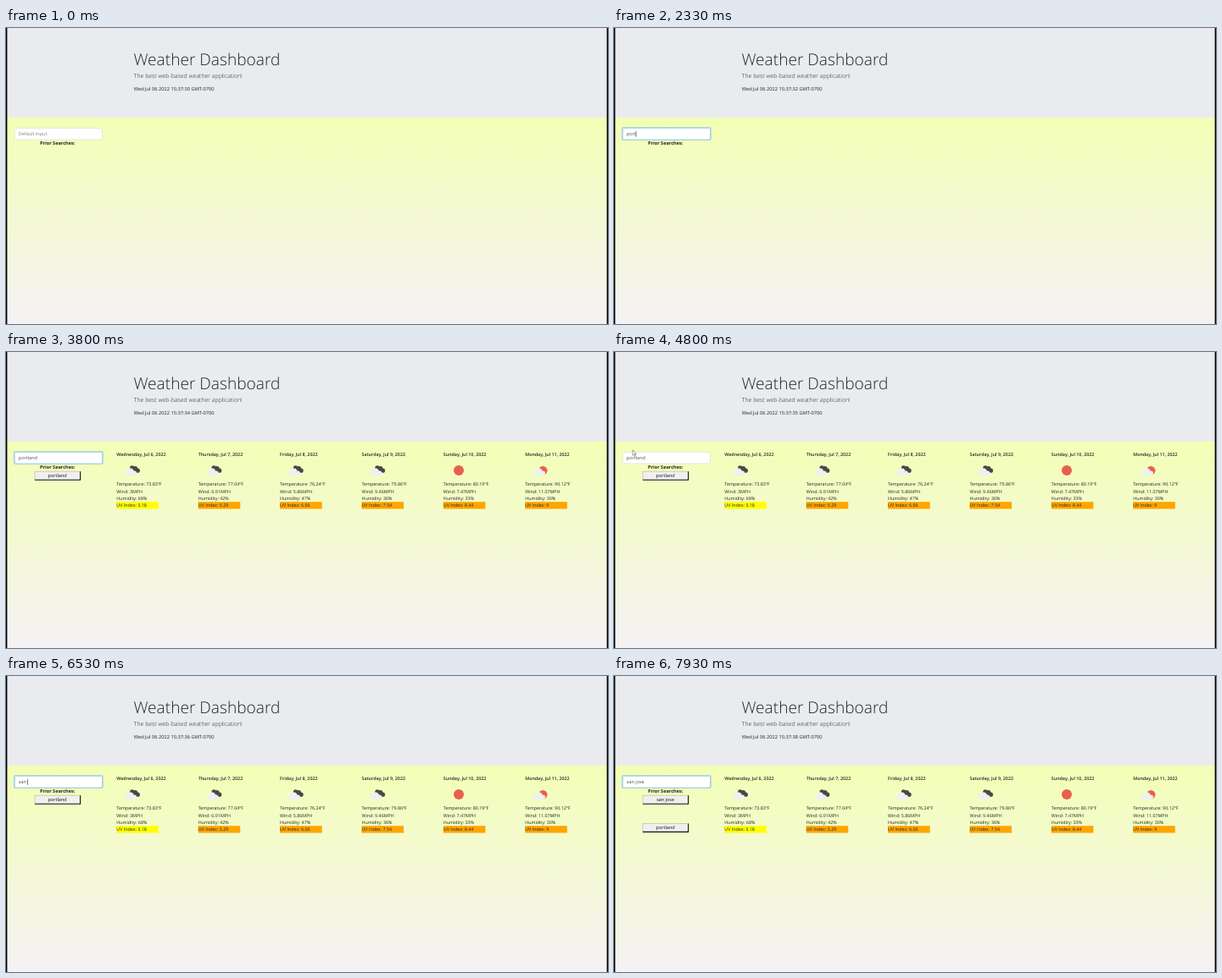
Animation of 710x350 px, one loop 8 s. Source, as an HTML page:

```html
<!DOCTYPE html>
<html lang="en">
<head>
<meta charset="utf-8">
<title>Weather Dashboard</title>
<style>
  html, body { margin: 0; width: 100%; height: 100%; overflow: hidden; background: #000; }
  svg { display: block; width: 100%; height: 100%; }
  text {
    font: 5.35px "Open Sans", "Noto Sans", sans-serif;
    fill: #212529;
    text-rendering: geometricPrecision;
    white-space: pre;
  }
  .title { font-size: 19.15px; font-weight: 300; }
  .lead { font-size: 6.96px; font-weight: 300; }
  .clock { font-size: 5.7px; }
  .date { font-weight: 600; }
  .prior { font-size: 5.56px; font-weight: 700; }
  .field { font-size: 5.5px; fill: #495057; }
  .field.empty { fill: #7b838a; }
  .label { font-size: 5.5px; text-anchor: middle; fill: #111; }
</style>
</head>
<body>
<svg viewBox="0 0 710 350">
  <defs>
    <linearGradient id="sky" x2="0" y2="1">
      <stop stop-color="#f3ffb5"/>
      <stop offset="1" stop-color="#f5f2f5"/>
    </linearGradient>
    <g id="cloud">
      <circle cx="3" cy="6" r="2.7"/><circle cx="7.2" cy="4" r="3.7"/><circle cx="11.8" cy="6" r="2.7"/>
      <rect x="3" y="4.5" width="9" height="4.2"/>
    </g>
    <g id="clouds">
      <g fill="#484848">
        <circle cx="18.5" cy="137" r="2.7"/><circle cx="22" cy="138" r="3"/><circle cx="25" cy="140.2" r="2.6"/>
      </g>
      <use href="#cloud" x="9.3" y="137.3" fill="#f0f0f0"/>
    </g>
    <g id="sun"><circle cx="18.2" cy="140" r="6" fill="#e8604c"/></g>
    <g id="partly">
      <circle cx="21" cy="140.3" r="5.2" fill="#e8604c"/>
      <use href="#cloud" x="9.3" y="137.3" fill="#f0f0f0"/>
    </g>
    <g id="button">
      <rect x="33.5" y="141" width="54.6" height="10.7" fill="#efefef"/>
      <path d="M33.8 151.5V141.3H88" fill="none" stroke="#cfab94" stroke-width=".6"/>
      <path d="M34 151.2H87.6V141.3" fill="none" stroke="#111" stroke-width="1.1"/>
    </g>
  </defs>

  <rect x="1.4" y="106" width="707.2" height="244" fill="url(#sky)"/>
  <rect x="1.4" width="707.2" height="106" fill="#e9ebee"/>
  <text class="title" x="150.4" y="44">Weather Dashboard</text>
  <text class="lead" x="150.8" y="59.2">The best web-based weather application!</text>
  <text class="clock" id="clock" x="150.8" y="74.2"></text>

  <rect id="glow" x="8.9" y="117.1" width="106" height="16" rx="2" fill="#007bff" fill-opacity=".28"/>
  <rect id="box" x="10.3" y="118.4" width="103.2" height="13.5" rx="1.4" fill="#fff" stroke-width=".5"/>
  <text id="field" x="14.8" y="127.2"></text>
  <rect id="caret" y="122" width=".6" height="6.8" fill="#222"/>
  <text class="prior" x="40" y="138.4">Prior Searches:</text>

  <g id="newSearch"><use href="#button"/><text class="label" x="60.6" y="148">san jose</text></g>
  <g id="oldSearch"><use href="#button"/><text class="label" x="60.6" y="148">portland</text></g>
  <g id="forecast"></g>

  <path id="arrow" d="M0 0V6.2L1.5 4.9L2.5 7.1L3.4 6.7L2.4 4.6H4.4Z" fill="#fff" stroke="#333" stroke-width=".45"/>
  <path id="beam" d="M-1-3H1M0-3V3M-1 3H1" fill="none" stroke="#333" stroke-width=".5"/>
</svg>
<script>
const LOOP = 8000;
const $ = id => document.getElementById(id);
const show = (id, visible) => $(id).setAttribute('visibility', visible ? 'visible' : 'hidden');

// date, icon, temperature, wind, humidity, UV index
const days = [
  ['Wednesday, Jul 6', 'clouds', '73.83', '3', 68, '3.18'],
  ['Thursday, Jul 7', 'clouds', '77.04', '6.91', 42, '5.29'],
  ['Friday, Jul 8', 'clouds', '76.24', '5.86', 47, '6.66'],
  ['Saturday, Jul 9', 'clouds', '79.86', '9.46', 36, '7.54'],
  ['Sunday, Jul 10', 'sun', '80.19', '7.47', 33, '8.44'],
  ['Monday, Jul 11', 'partly', '90.12', '11.07', 30, '9']
];
$('forecast').innerHTML = days.map(([date, icon, temp, wind, humidity, uv], i) => `
  <g transform="translate(${130.3 + i * 96.38})">
    <text class="date" y="123.3">${date}, 2022</text>
    <use href="#${icon}"/>
    <text y="158.2">Temperature: ${temp}ºF</text>
    <text y="166.5">Wind: ${wind}MPH</text>
    <text y="174.8">Humidity: ${humidity}%</text>
    <rect y="177.2" width="49.6" height="8.3" fill="${uv < 5 ? '#ff0' : '#ffa500'}"/>
    <text y="183.1">UV Index: ${uv}</text>
  </g>`).join('');

// Each edit is [time, field value]; focusing also restarts the caret blink.
const type = (word, start, step) => [...word].map((_, i) => [start + i * step, word.slice(0, i + 1)]);
const erase = (word, start, step) => [...word].map((_, i) => [start + i * step, word.slice(0, -1 - i)]);
const edits = [
  [0, ''], [1000, ''],
  ...type('portland', 1900, 138),
  [5000, 'portland'],
  ...erase('portland', 5500, 50),
  ...type('san jose', 6060, 145)
];

// Pointer keys: [time, x, y]; it is hidden outside each path.
const paths = [
  [[60, 550, 154], [300, 400, 148], [600, 150, 134], [860, 46, 126], [1900, 46, 126]],
  [[4200, 40, 126], [4550, 22, 116], [4850, 22, 116], [5000, 24, 125], [5350, 24, 125]]
];
const ease = u => u * u * (3 - 2 * u);

function pointerAt(t) {
  for (const path of paths) {
    for (let i = 1; i < path.length; i++) {
      const [t0, x0, y0] = path[i - 1], [t1, x1, y1] = path[i];
      if (t <= t0 || t > t1) continue;
      const u = ease((t - t0) / (t1 - t0));
      return [x0 + (x1 - x0) * u, y0 + (y1 - y0) * u];
    }
  }
  return null;
}

function draw(t) {
  $('clock').textContent = `Wed Jul 06 2022 15:37:${30 + Math.floor((t + 330) / 1000)} GMT-0700`;

  const [editTime, value] = edits.filter(([time]) => time <= t).pop();
  const focused = t >= 1000 && !(t >= 4600 && t < 5000);
  const field = $('field');
  field.textContent = value || 'Default input';
  field.setAttribute('class', value ? 'field' : 'field empty');
  show('glow', focused);
  $('box').setAttribute('stroke', focused ? '#80bdff' : '#ced4da');
  $('caret').setAttribute('x', 14.8 + (value ? field.getComputedTextLength() : 0));
  show('caret', focused && (t - editTime) % 1000 < 500);

  const searchedAgain = t >= 7600;
  show('newSearch', searchedAgain);
  show('oldSearch', t >= 3350);
  $('oldSearch').setAttribute('transform', `translate(0 ${searchedAgain ? 33.2 : 0})`);
  show('forecast', t >= 3530);

  const pointer = pointerAt(t);
  const overField = pointer && pointer[0] < 113 && pointer[1] > 118.5 && pointer[1] < 132;
  show('arrow', pointer && !overField);
  show('beam', overField);
  if (pointer) for (const id of ['arrow', 'beam']) $(id).setAttribute('transform', `translate(${pointer})`);
}

const start = performance.now();
function frame() {
  draw((performance.now() - start) % LOOP);
  requestAnimationFrame(frame);
}
frame();
</script>
</body>
</html>
```
